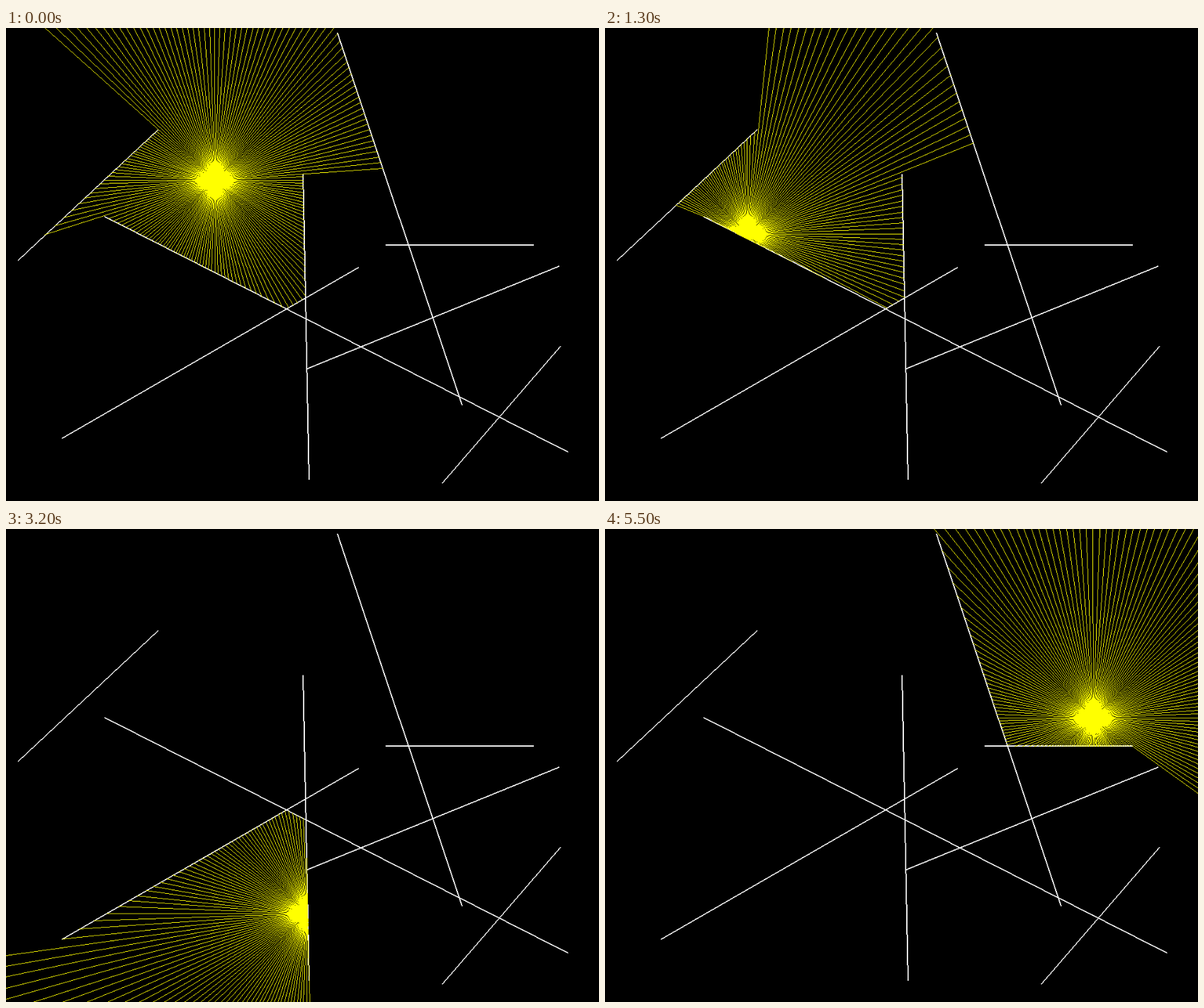
Animation of 837 by 669 pixels, one loop 5600 ms. Source, as an HTML page with a canvas:

```html
<!DOCTYPE html>
<html lang="en">
<head>
<meta charset="utf-8">
<title>Ray casting</title>
<style>
  html, body { margin: 0; width: 100%; height: 100%; overflow: hidden; background: #000; }
  canvas { display: block; width: 837px; height: 669px; }
</style>
</head>
<body>
<canvas id="stage" width="837" height="669"></canvas>
<script>
// The scene is rasterised without smoothing at W x H, then scaled down to the stage.
const W = 1000, H = 800, SCALE = W / 837;
const STEP = 100, LOOP = 5600, SPREAD = 2;
const WHITE = 0xffffffff, YELLOW = 0xff00ffff, BLACK = 0xff000000;

const stage = document.getElementById('stage');
const ctx = stage.getContext('2d');
const scene = document.createElement('canvas');
scene.width = W;
scene.height = H;
const sceneCtx = scene.getContext('2d');
const image = sceneCtx.createImageData(W, H);
const pixels = new Uint32Array(image.data.buffer);

const toScene = v => Math.round(v * SCALE);

const walls = [
  [468, 7, 644, 533],
  [17, 329, 214, 144],
  [139, 267, 793, 600],
  [419, 207, 428, 639],
  [79, 581, 497, 339],
  [425, 482, 780, 337],
  [536, 307, 744, 307],
  [616, 644, 783, 450]
].map(wall => wall.map(toScene));
const borders = [[0, 0, W, 0], [W, 0, W, H], [W, H, 0, H], [0, H, 0, 0]];
const obstacles = walls.concat(borders);

// Key points of the light's path: step, x, y
const path = [
  [2, 295, 215], [5, 259, 160], [8, 218, 184], [13, 201, 291],
  [20, 158, 384], [26, 258, 510], [32, 424, 544], [38, 541, 516],
  [41, 550, 478], [45, 554, 425], [50, 540, 368], [51, 547, 330], [55, 689, 267]
];

function slope(i, axis) {
  const a = path[Math.max(i - 1, 0)], b = path[Math.min(i + 1, path.length - 1)];
  return (b[axis] - a[axis]) / (b[0] - a[0]);
}

// Cubic Hermite interpolation between key points
function lightAt(step) {
  let i = 0;
  while (i < path.length - 2 && path[i + 1][0] <= step) i++;
  const a = path[i], b = path[i + 1], span = b[0] - a[0];
  const s = (step - a[0]) / span, s2 = s * s, s3 = s2 * s;
  return [1, 2].map(axis => toScene(
    (2 * s3 - 3 * s2 + 1) * a[axis] + (3 * s2 - 2 * s3) * b[axis] +
    span * ((s3 - 2 * s2 + s) * slope(i, axis) + (s3 - s2) * slope(i + 1, axis))
  ));
}

function plot(x, y, color) {
  if (x >= 0 && x < W && y >= 0 && y < H) pixels[y * W + x] = color;
}

// Bresenham line; extra width grows to the left or upwards
function line(x, y, x2, y2, color, width = 1) {
  const dx = Math.abs(x2 - x), dy = Math.abs(y2 - y);
  const sx = Math.sign(x2 - x), sy = Math.sign(y2 - y);
  const flat = dx > dy;
  let err = dx - dy;
  for (let n = Math.max(dx, dy); n >= 0; n--) {
    for (let k = 0; k < width; k++) plot(x - (flat ? 0 : k), y - (flat ? k : 0), color);
    const e = 2 * err;
    if (e > -dy) { err -= dy; x += sx; }
    if (e < dx) { err += dx; y += sy; }
  }
}

function castRay(x, y, angle) {
  const cx = Math.cos(angle), cy = Math.sin(angle);
  let nearest = Infinity;
  for (const [x1, y1, x2, y2] of obstacles) {
    const wx = x2 - x1, wy = y2 - y1, det = cx * wy - cy * wx;
    if (!det) continue;
    const dist = ((x1 - x) * wy - (y1 - y) * wx) / det;
    const along = ((x1 - x) * cy - (y1 - y) * cx) / det;
    if (along >= 0 && along <= 1 && dist > 0 && dist < nearest) nearest = dist;
  }
  line(x, y, Math.floor(x + cx * nearest), Math.floor(y + cy * nearest), YELLOW);
}

function draw(step) {
  pixels.fill(BLACK);
  for (const wall of walls) line(...wall, WHITE, 2);
  const [x, y] = lightAt(step);
  for (let deg = 0; deg < 360; deg += SPREAD) castRay(x, y, deg * Math.PI / 180);
  sceneCtx.putImageData(image, 0, 0);
  ctx.drawImage(scene, 0, 0, stage.width, stage.height);
}

let shown = -1;
function tick() {
  const step = Math.max(path[0][0], Math.floor(performance.now() % LOOP / STEP));
  if (step !== shown) draw(shown = step);
  requestAnimationFrame(tick);
}
tick();
</script>
</body>
</html>
```
